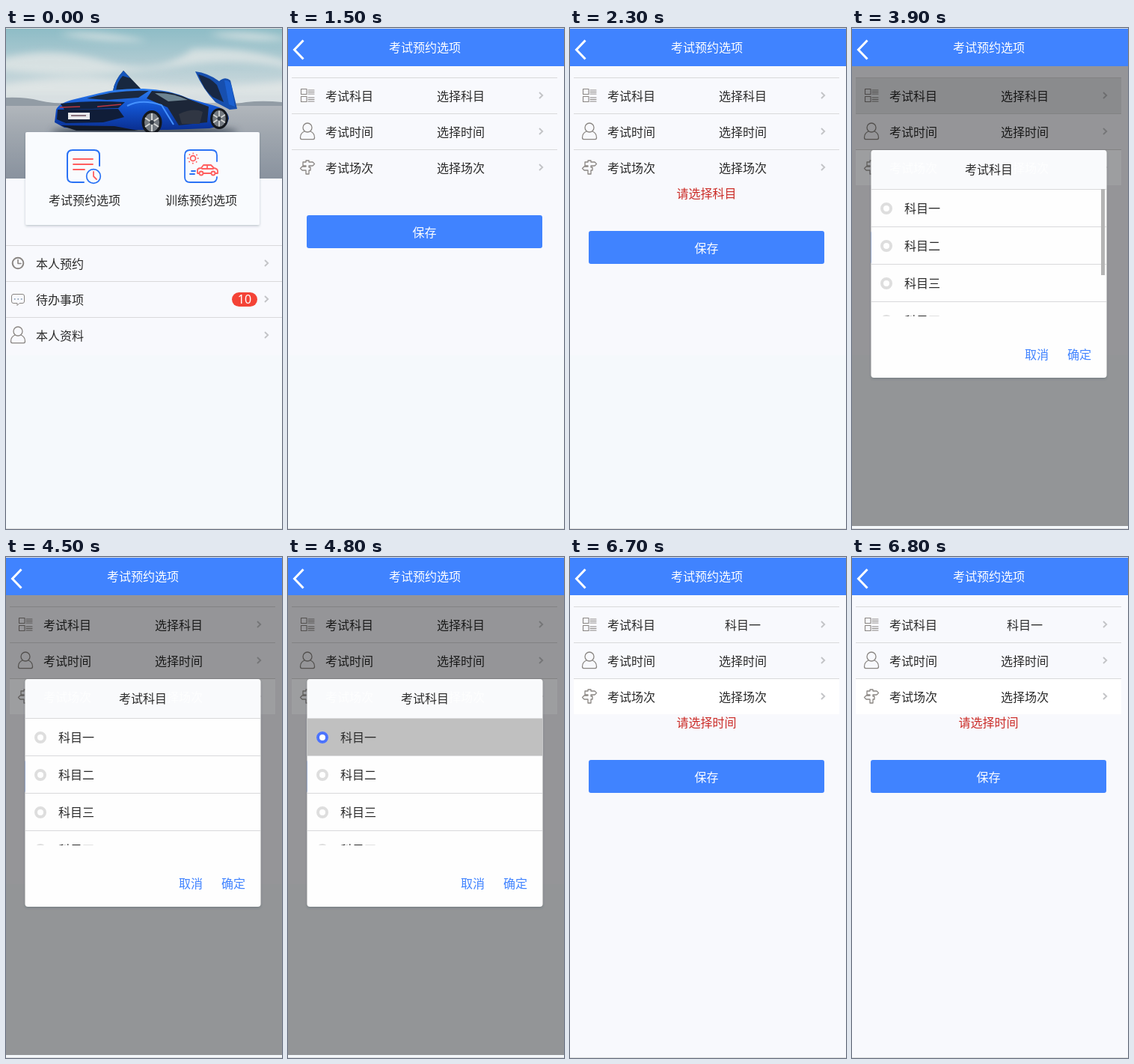
Recreate the animation shown at these times as an HTML page. Size 369 by 669 pixels, loop 8 s.

```html
<!DOCTYPE html>
<html lang="zh-CN">
<head>
<meta charset="utf-8">
<title>考试预约</title>
<style>
html, body { margin: 0; width: 100%; height: 100%; overflow: hidden; background: #f8f9fc; }
svg { display: block; width: 100%; height: 100%; }
text { font: 16px "Noto Sans CJK SC", "Noto Sans CJK", "Noto Sans CJK JP", sans-serif; fill: #2a2a2a; }
.mid { text-anchor: middle; }
.white { fill: #fff; }
.error { fill: #cb2a25; }
.link { fill: #4083ff; }
.title { font-weight: 500; }
.badge { font-family: "Noto Sans", sans-serif; }
.line { stroke: #d9d9db; fill: none; }
.icon { stroke: #8a8683; stroke-width: 1.3; fill: none; stroke-linejoin: round; stroke-linecap: round; }
.blue { stroke: #2a72f5; stroke-width: 2; fill: none; stroke-linecap: round; }
.red { stroke: #ff5f5f; stroke-width: 1.8; fill: none; stroke-linecap: round; stroke-linejoin: round; }
.radio { fill: #fff; stroke: #dedede; stroke-width: 4; }

/* One loop is 8 s, so 1.25% is 100 ms */
.anim { animation: 8s step-end infinite; }
.home { animation-name: home; }
.form { animation-name: form; }
.save { animation-name: save; }
.noSubject { animation-name: noSubject; }
.noTime { animation-name: noTime; }
.unset { animation-name: unset-value; }
.chosen { animation-name: chosen; }
.modal { animation-name: modal; }
.pressed { animation-name: pressed; }
.scrollbar { animation-name: scrollbar; }
.picked { animation-name: picked; }
@keyframes home { 0% { opacity: 1 } 18.75%, 100% { opacity: 0 } }
@keyframes form { 0% { opacity: 0 } 18.75%, 100% { opacity: 1 } }
@keyframes save { 0% { transform: none } 27.5%, 100% { transform: translateY(21px) } }
@keyframes noSubject { 0% { opacity: 0 } 27.5% { opacity: 1 } 83.75%, 100% { opacity: 0 } }
@keyframes noTime { 0% { opacity: 0 } 83.75%, 100% { opacity: 1 } }
@keyframes unset-value { 0% { opacity: 1 } 67.5%, 100% { opacity: 0 } }
@keyframes chosen { 0% { opacity: 0 } 67.5%, 100% { opacity: 1 } }
@keyframes modal { 0% { opacity: 0 } 48.75% { opacity: 1 } 67.5%, 100% { opacity: 0 } }
@keyframes pressed { 0% { opacity: 1 } 50%, 100% { opacity: 0 } }
@keyframes scrollbar { 0% { opacity: 1 } 55% { opacity: .5 } 56.25%, 100% { opacity: 0 } }
@keyframes picked { 0% { opacity: 0 } 60%, 100% { opacity: 1 } }
</style>
</head>
<body>
<svg viewBox="0 0 369 669" preserveAspectRatio="none">
<defs>
  <linearGradient id="sky" x2="0" y2="1">
    <stop stop-color="#8dbcc6"/><stop offset=".45" stop-color="#b0cbd2"/><stop offset="1" stop-color="#dce1e3"/>
  </linearGradient>
  <linearGradient id="ground" x2="0" y2="1">
    <stop stop-color="#b3b8bd"/><stop offset=".4" stop-color="#a0a7af"/><stop offset="1" stop-color="#89929e"/>
  </linearGradient>
  <linearGradient id="paint" x2="0" y2="1">
    <stop stop-color="#2f7fee"/><stop offset=".45" stop-color="#1253cf"/><stop offset="1" stop-color="#0a2f91"/>
  </linearGradient>
  <filter id="soft" x="-20%" y="-80%" width="140%" height="260%"><feGaussianBlur stdDeviation="5"/></filter>
  <filter id="shadow" x="-5%" y="-5%" width="110%" height="115%"><feDropShadow dx="0" dy="1.5" stdDeviation="1.5" flood-color="#345" flood-opacity=".28"/></filter>
  <clipPath id="hero"><path d="M0 1H369V201H0z"/></clipPath>
  <clipPath id="list"><path d="M26 215H340V385H26z"/></clipPath>

  <path id="chevron" d="M-2 -4L2.2 0L-2 4" fill="none" stroke="#c3c4c7" stroke-width="1.9"/>
  <g id="person" class="icon">
    <circle cy="-5" r="6"/>
    <path d="M-4 0C-8 1.5 -9.5 5 -9.5 8.5Q-9.5 10.7 -7 10.7H7Q9.5 10.7 9.5 8.5C9.5 5 8 1.5 4 0"/>
  </g>
  <g id="wheel">
    <ellipse rx="13.5" ry="16" fill="#15181d"/>
    <ellipse rx="10" ry="12.5" fill="#737980"/>
    <path d="M0 -12V12M-9 -6L9 6M-9 6L9 -6" stroke="#d3d5d4" stroke-width="2"/>
    <circle r="3" fill="#333a43"/>
  </g>
</defs>

<rect width="369" height="669" fill="#f8f9fd"/>

<g class="anim home">
  <rect y="437" width="369" height="231" fill="#f5f9fc"/>

  <g clip-path="url(#hero)">
    <rect width="369" height="102" fill="url(#sky)"/>
    <g filter="url(#soft)" fill="#e4e8e7" opacity=".75">
      <path d="M-10 42Q60 22 130 44T250 28Q320 24 380 46L380 54Q310 40 240 50T110 62T-10 56z"/>
      <path d="M-10 78Q80 58 170 72T380 70V90H-10z"/>
      <path d="M70 8Q120 2 190 17Q130 20 70 8z"/>
      <path d="M270 8Q330 2 380 15Q320 20 270 8z"/>
    </g>
    <rect y="100" width="369" height="101" fill="url(#ground)"/>
    <path d="M0 102V93Q25 92 45 97T100 101V104H0zM300 103Q330 95 369 99V104H300z" fill="#929ca5"/>
    <ellipse cx="185" cy="139" rx="125" ry="8" fill="#46515e" filter="url(#soft)"/>

    <path d="M143 84Q145 70 157 57L181 82L174 86z" fill="#18283f"/>
    <path d="M143 84Q145 70 157 57L166 67L156 64Q148 72 147 84z" fill="#1556bd"/>
    <path d="M253 58Q270 60 285 71Q293 64 300 70L309 108L299 109L280 99Q264 83 253 58z" fill="#174fae"/>
    <path d="M257 62Q273 66 282 76L291 99L276 92Q264 82 257 62z" fill="#182844"/>
    <path d="M292 70Q300 69 302 79L306 105L298 102z" fill="#1c60d0"/>
    <path d="M65 126L67 109Q71 100 92 95L125 87Q150 80 184 81Q218 82 244 94L276 103Q297 108 298 121L295 129L272 134L216 136H132L78 133z" fill="url(#paint)"/>
    <path d="M108 94Q148 82 191 84L177 93L135 96z" fill="#1a2940"/>
    <path d="M195 84Q224 84 247 96L271 105L269 126L231 130L216 106L188 94z" fill="#1c2638"/>
    <path d="M199 87Q222 86 243 96L217 98z" fill="#6d8491"/>
    <path d="M231 115Q251 106 263 112L259 128H235z" fill="#303643"/>
    <path d="M73 101Q114 96 159 99L150 107L78 109z" fill="#11213d"/>
    <path d="M69 109L150 108L158 119L130 126L80 127L68 122z" fill="#101d38"/>
    <path d="M72 106L99 105M122 105L154 102" stroke="#b93742" stroke-width="1.5"/>
    <path d="M73 130L145 131L177 137H94z" fill="#121a29"/>
    <path d="M162 104Q181 94 208 103L224 129" fill="none" stroke="#4592ff" stroke-width="2"/>
    <path d="M83 113H112V122H83z" fill="#e9eaec"/>
    <path d="M87 117H107" stroke="#88727d" stroke-width="2"/>
    <use href="#wheel" x="195" y="126"/>
    <use href="#wheel" transform="translate(285 121) scale(.88)"/>
  </g>

  <rect x="26" y="139" width="313" height="124" rx="2" fill="#f9fbfe" filter="url(#shadow)"/>
  <path class="blue" d="M104 206H89Q82 206 82 199V170Q82 163 89 163H118Q125 163 125 170V184"/>
  <path class="red" d="M90 175H116M90 182H116M90 189H105"/>
  <circle class="blue" cx="117" cy="198" r="9.3" style="stroke-width:1.7"/>
  <path class="red" d="M117 192V198L121 202"/>
  <path class="blue" d="M282 178V170Q282 163 275 163H246Q239 163 239 170V199Q239 206 246 206H275Q282 206 282 199M246 195H252M248 191H253" style="stroke-width:1.8"/>
  <circle class="red" cx="250" cy="174" r="3.5"/>
  <circle class="red" cx="250" cy="174" r="6.7" stroke-dasharray=".2 5.06"/>
  <path class="red" d="M258 194H256V189Q257 187 261 187L264 183H274L278 187Q283 188 283 191V194H280M264 194H274M262 188H277M269 184V188"/>
  <circle class="red" cx="261" cy="194" r="2.5"/>
  <circle class="red" cx="277" cy="194" r="2.5"/>
  <text x="57" y="236">考试预约选项</text>
  <text x="213" y="236">训练预约选项</text>

  <path class="line" d="M0 290.5H369M0 338.5H369M0 386.5H369"/>
  <circle class="icon" cx="16" cy="314" r="7.3" style="stroke-width:2"/>
  <path class="icon" d="M16 309.5V314.5H20" style="stroke-width:1.6"/>
  <path class="icon" d="M10 355.5H22Q24.5 355.5 24.5 358V365Q24.5 367.5 22 367.5H18L15 370.5V367.5H10Q7.5 367.5 7.5 365V358Q7.5 355.5 10 355.5z" style="stroke-width:1"/>
  <path class="icon" d="M11.5 362H12M16 362H16.5M20.5 362H21" style="stroke-width:1.5;stroke:#6f8ba5"/>
  <use href="#person" x="16" y="410"/>
  <text x="40" y="321">本人预约</text>
  <text x="40" y="369">待办事项</text>
  <text x="40" y="417">本人资料</text>
  <rect x="302" y="353" width="34" height="19" rx="9.5" fill="#f44336"/>
  <text class="mid white badge" x="319" y="368">10</text>
  <use href="#chevron" x="348" y="314"/>
  <use href="#chevron" x="348" y="362"/>
  <use href="#chevron" x="348" y="410"/>
</g>

<g class="anim form">
  <rect class="anim unset" y="437" width="369" height="231" fill="#f5f9fc"/>
  <rect y="1" width="369" height="50" fill="#4083ff"/>
  <path d="M20.5 16.5L8.5 29L20.5 41.5" fill="none" stroke="#fff" stroke-width="3"/>
  <text class="mid white" x="183" y="32">考试预约选项</text>

  <rect class="anim noTime" x="5" y="163" width="355" height="47" fill="#fff"/>
  <path class="line" d="M5 66.5H360M5 114.5H360M5 162.5H360"/>
  <path class="icon" d="M17.5 81.5H25V88.5H17.5zM17.5 91.5H25V98.5H17.5zM27 83H35M27 85.5H35M27 88H35M27 93H35M27 95.5H35M27 98H35" style="stroke-width:1.1"/>
  <use href="#person" x="26" y="138"/>
  <path class="icon" d="M24 179V177H28V179H33L35.5 181.5L33 184H28V186H30V190H28V195H24V190H19L16.5 187.5L19 185H24V184H20V179z"/>
  <text x="50" y="97">考试科目</text>
  <text x="50" y="145">考试时间</text>
  <text x="50" y="193">考试场次</text>
  <text class="mid anim unset" x="231" y="97">选择科目</text>
  <text class="mid anim chosen" x="231" y="97">科目一</text>
  <text class="mid" x="231" y="145">选择时间</text>
  <text class="mid" x="231" y="193">选择场次</text>
  <use href="#chevron" x="338" y="90"/>
  <use href="#chevron" x="338" y="138"/>
  <use href="#chevron" x="338" y="186"/>

  <text class="mid error anim noSubject" x="182.5" y="227">请选择科目</text>
  <text class="mid error anim noTime" x="182.5" y="227">请选择时间</text>
  <g class="anim save">
    <rect x="25" y="250" width="315" height="44" rx="3" fill="#4083ff"/>
    <text class="mid white" x="182.5" y="279">保存</text>
  </g>

  <g class="anim modal">
    <rect y="51" width="369" height="614" opacity=".4"/>
    <rect x="5" y="163" width="355" height="47" fill="#fff" opacity=".08"/>
    <rect class="anim pressed" x="5" y="67" width="355" height="47" fill="#000" fill-opacity=".07"/>
    <rect x="25.5" y="163" width="315" height="304" rx="4" fill="#fefefe" filter="url(#shadow)"/>
    <path d="M26 215V167Q26 163 30 163H336Q340 163 340 167V215z" fill="#f9fafc"/>
    <g opacity=".8">
      <text class="white" x="50" y="193">考试场次</text>
      <text class="white" x="199" y="193">选择场次</text>
    </g>
    <text class="mid title" x="183" y="195">考试科目</text>
    <g clip-path="url(#list)">
      <rect class="anim picked" x="26" y="216" width="314" height="49" fill="#c0c0c0"/>
      <path class="line" d="M26 215.5H340M26 265.5H340M26 315.5H340M26 365.5H340"/>
      <circle class="radio" cx="46" cy="241" r="6"/>
      <circle class="radio anim picked" cx="46" cy="241" r="6" style="stroke:#4c73fb"/>
      <circle class="radio" cx="46" cy="291" r="6"/>
      <circle class="radio" cx="46" cy="341" r="6"/>
      <circle class="radio" cx="46" cy="391" r="6"/>
      <text x="70" y="247">科目一</text>
      <text x="70" y="297">科目二</text>
      <text x="70" y="347">科目三</text>
      <text x="70" y="397">科目四</text>
      <rect class="anim scrollbar" x="333" y="215" width="5" height="115" fill="#b5b5b5"/>
    </g>
    <text class="link" x="231" y="442">取消</text>
    <text class="link" x="288" y="442">确定</text>
  </g>
</g>

<path d="M0 .5H369M0 668.5H369" stroke="#dededf"/>
</svg>
</body>
</html>
```
